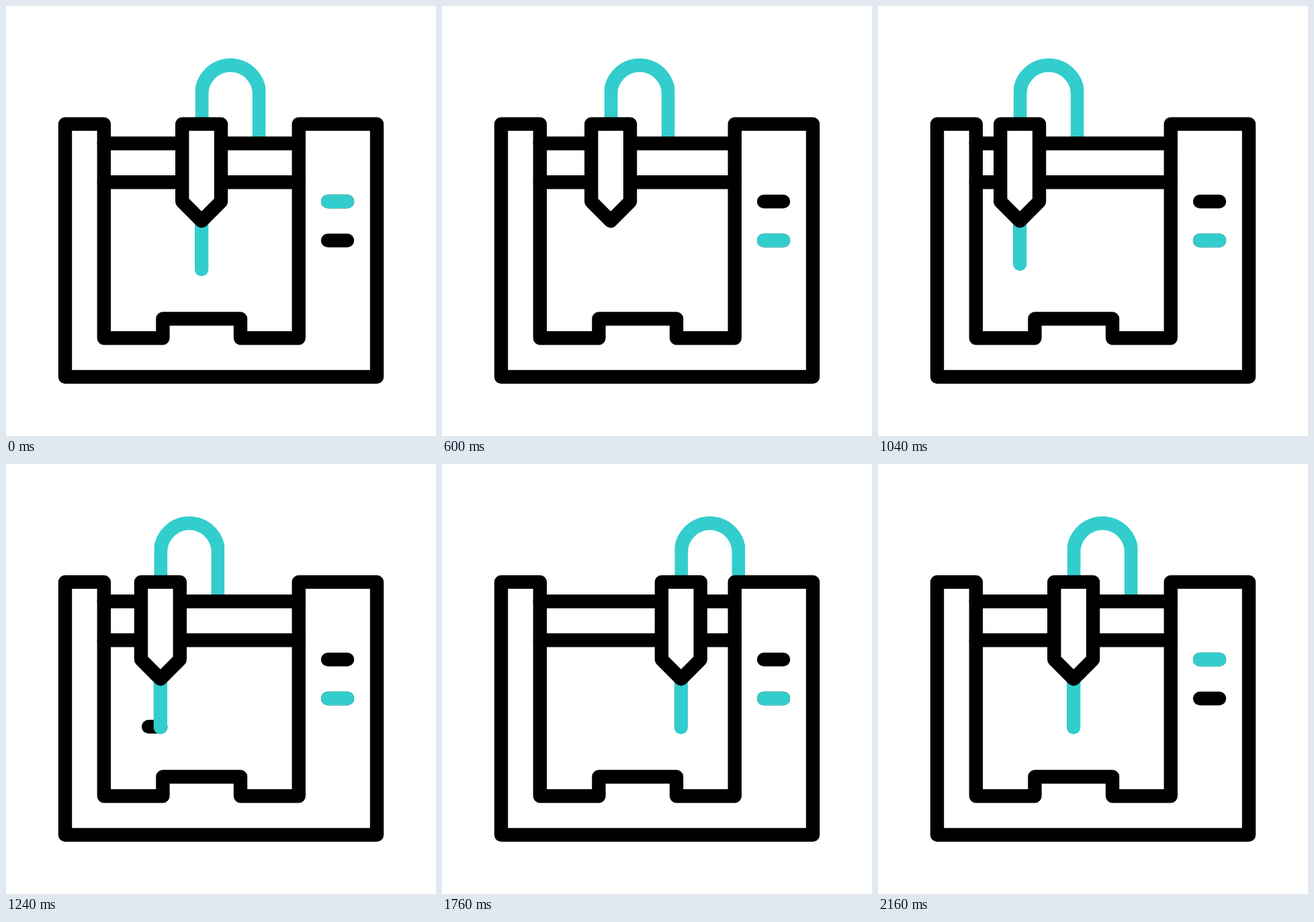
An HTML page that plays this animation: 640x640 px, repeating every 2.32 s.

```html
<!DOCTYPE html>
<html lang="en">
<head>
<meta charset="utf-8">
<title>3D printer</title>
<style>
  html, body { margin: 0; width: 100%; height: 100%; overflow: hidden; background: #fff; }
  svg { display: block; width: 100vw; height: 100vh; }
  .ink { stroke: #000; }
  .teal { stroke: #33cdcd; }
</style>
</head>
<body>
<svg viewBox="0 0 640 640" fill="none" stroke-width="20.4" stroke-linecap="round" stroke-linejoin="round">
  <clipPath id="hoseClip"><path d="M281.8 70H386.4V210H281.8Z"/></clipPath>
  <g id="hose"><path class="teal" clip-path="url(#hoseClip)" d="M291.2 200V131a42.9 42.9 0 0 1 85.8 0V204" stroke-linecap="butt"/></g>
  <path class="ink" fill="#fff" d="M88 175.6H145.8V494.3H233.4V465.5H349V494.3H435.7V175.6H552V552H88Z"/>
  <path class="ink" d="M145.8 204.5H435.7M145.8 262.2H435.7"/>
  <path class="ink" id="print" d=""/>
  <g id="head">
    <path class="teal" id="filament"/>
    <path class="ink" fill="#fff" d="M262.2 175.6H320V291L291.1 320L262.2 291Z"/>
  </g>
  <path class="ink" d="M479 291H508M479 349H508"/>
  <path class="teal" id="topLight" d="M479 291H508"/>
  <path class="teal" id="lowLight" d="M479 349H508"/>
</svg>
<script>
const LOOP = 2320, STEP = 40, HOME = 291, LEFT = 211, RIGHT = 361;
const el = id => document.getElementById(id);

// Symmetric ease-in-out, equal to cubic-bezier(.5, 0, .5, 1)
function ease(x) {
  if (x <= 0 || x >= 1) return x <= 0 ? 0 : 1;
  let lo = 0, hi = 1;
  for (let i = 0; i < 24; i++) {
    const s = (lo + hi) / 2;
    if (s + 0.5 * s * (1 - s) * (1 - 2 * s) < x) lo = s; else hi = s;
  }
  return lo * lo * (3 - 2 * lo);
}
const ramp = (t, start, length) => ease((t - start) / length);

function draw(t) {
  const x = HOME
    + (LEFT - HOME) * ramp(t, 340, 520)
    + (RIGHT - LEFT) * ramp(t, 1100, 520)
    + (HOME - RIGHT) * ramp(t, 1650, 510);
  const shift = `translate(${x - HOME})`;
  el("hose").setAttribute("transform", shift);
  el("head").setAttribute("transform", shift);

  const out = 1 - ramp(t, 140, 220) + ramp(t, 860, 240);
  el("filament").setAttribute("d", `M291.1 300V${316 + 76 * out}`);

  const tail = LEFT + 0.8 + (RIGHT - LEFT) * ramp(t, 1220, 520);
  const printing = t > 1100 && t < 1740 && tail < x;
  el("print").setAttribute("d", printing ? `M${tail} 391H${x + 0.5}` : "");

  const low = ramp(t, 140, 220) - ramp(t, 1920, 220);
  el("lowLight").setAttribute("opacity", low);
  el("topLight").setAttribute("opacity", 1 - low);
}

const begin = performance.now();
function tick() {
  const t = (performance.now() - begin) % LOOP;
  draw(Math.floor(t / STEP) * STEP);
  requestAnimationFrame(tick);
}
tick();
</script>
</body>
</html>
```
